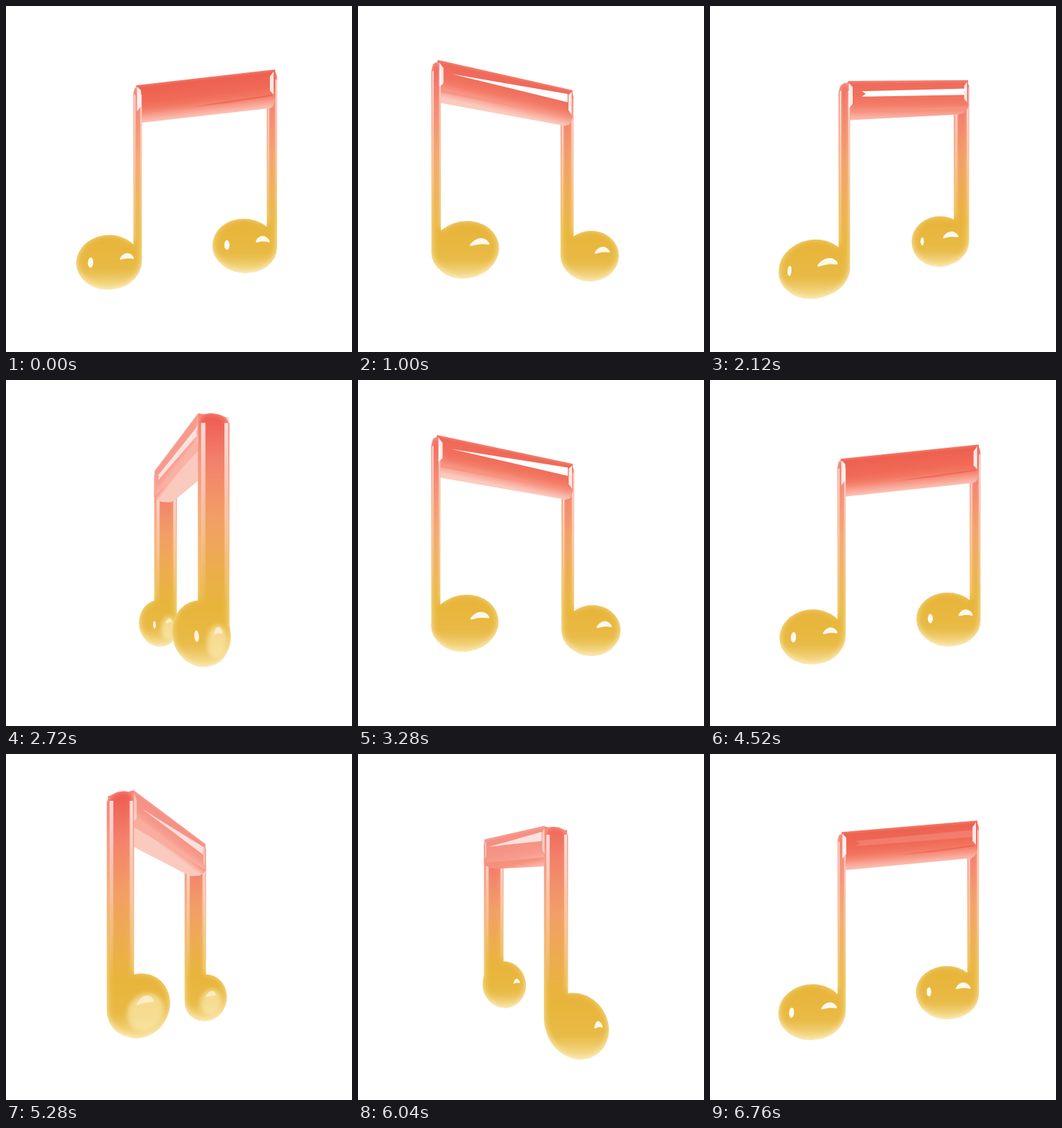
Write an HTML page with a canvas that moves like this. It is 480 px wide and 480 px high and loops after 6.8 s.

```html
<!DOCTYPE html>
<html lang="en">
<head>
<meta charset="utf-8">
<title>Spinning note</title>
<style>
  html, body { margin: 0; width: 100%; height: 100%; overflow: hidden; background: #fff; }
  canvas { display: block; width: 480px; height: 480px; }
</style>
</head>
<body>
<canvas id="stage" width="480" height="480"></canvas>
<script>
const ctx = document.getElementById('stage').getContext('2d');
const LOOP = 6800, STEP = 40, TURNS = 3;
const CENTER = 240, EYE = 510, AXIS_SHIFT = 3;
const HEAD = { x: 44, y: 37, z: 32 };
const STEM = { x: 5.5, z: 18 };
const BEAM = { depth: 17, fold: 39, height: 47 };
const LEFT = { x: -57, top: -125, head: { x: -97, y: 114.5 } };
const RIGHT = { x: 128, top: -146, head: { x: 90, y: 92 } };

let cos = 1, sin = 0;

const lerp = (a, b, u) => a + (b - a) * u;
const ramp = (a, b, v) => Math.min(1, Math.max(0, (v - a) / (b - a)));
const white = alpha => `rgba(255,255,255,${alpha})`;

// Turn a point around the vertical axis, then apply perspective.
function view([x, y, depth]) {
  const z = depth + AXIS_SHIFT;
  const k = EYE / (EYE - x * sin - z * cos);
  return [CENTER + (x * cos - z * sin) * k, CENTER + y * k];
}

function hull(points) {
  const sorted = points.map(view).sort((a, b) => a[0] - b[0] || a[1] - b[1]);
  const half = list => {
    const out = [];
    for (const p of list) {
      while (out.length > 1) {
        const [a, b] = out.slice(-2);
        if ((b[0] - a[0]) * (p[1] - a[1]) > (b[1] - a[1]) * (p[0] - a[0])) break;
        out.pop();
      }
      out.push(p);
    }
    return out.slice(0, -1);
  };
  return [...half(sorted), ...half(sorted.reverse())];
}

function outline(points) {
  const path = new Path2D();
  points.forEach(p => path.lineTo(p[0], p[1]));
  path.closePath();
  return path;
}

function fill(path, style) {
  ctx.fillStyle = style;
  ctx.fill(path);
}

function gradient(from, to, stops) {
  const g = ctx.createLinearGradient(...from, ...to);
  stops.forEach(([at, color]) => g.addColorStop(at, color));
  return g;
}

// Blurred fill that stays inside another shape.
function softFill(inside, path, style, blur, lift = 0) {
  ctx.save();
  ctx.clip(inside);
  ctx.filter = `blur(${blur}px)`;
  ctx.translate(0, -lift);
  fill(path, style);
  ctx.restore();
}

function ring(x, y, scale) {
  return Array.from({ length: 32 }, (_, i) => {
    const a = i / 16 * Math.PI;
    return [x + STEM.x * scale * Math.cos(a), y, STEM.z * scale * Math.sin(a)];
  });
}

function ellipsoid({ x, y }) {
  const points = [];
  for (let i = 0; i <= 16; i++) {
    const lat = (i / 16 - 0.5) * Math.PI, r = Math.cos(lat);
    for (let j = 0; j < 28; j++) {
      const lon = j / 14 * Math.PI;
      points.push([x + HEAD.x * r * Math.cos(lon), y + HEAD.y * Math.sin(lat), HEAD.z * r * Math.sin(lon)]);
    }
  }
  return points;
}

// Stem end curving into the underside of the head.
function bend(note) {
  return Array.from({ length: 9 }, (_, i) => {
    const a = i / 16 * Math.PI;
    return ring(lerp(note.head.x, note.x, Math.cos(a)), note.head.y + HEAD.y * Math.sin(a), Math.cos(a));
  }).flat();
}

// Patch of the head whose surface faces a fixed light.
function glint(center, light, rx, ry, arch = 0) {
  const lean = -(center.x * cos) / EYE / 2;
  return outline(Array.from({ length: 28 }, (_, i) => {
    const a = i / 14 * Math.PI, dx = rx * Math.cos(a);
    const X = light[0] + lean + dx, y = light[1] + ry * Math.sin(a) + arch * dx * dx;
    const Z = Math.sqrt(Math.max(0.02, 1 - X * X - y * y));
    const x = X * cos + Z * sin, z = Z * cos - X * sin;
    const h = Math.hypot(HEAD.x * x, HEAD.y * y, HEAD.z * z);
    return view([center.x + HEAD.x ** 2 * x / h, center.y + HEAD.y ** 2 * y / h, HEAD.z ** 2 * z / h]);
  }));
}

function shineHead(head, path) {
  const soft = ramp(0.4, 0.9, sin);
  if (soft) softFill(path, glint(head, [0.4, 0.05], 0.45, 0.55), `rgba(252,236,182,${0.7 * soft})`, 3);
  fill(glint(head, [-0.41, -0.14], 0.07, 0.16), white(0.95 * ramp(-0.2, 0.4, cos)));
  fill(glint(head, [0.45, -0.35], 0.2, 0.09, 2.5), white(0.9 - 0.4 * soft));
}

// Bright vertical reflections that fade on the way down.
function shineStem(note, points) {
  const xs = points.map(p => p[0]), min = Math.min(...xs), max = Math.max(...xs);
  const top = view([note.x, note.top + 9, 0])[1], foot = view([note.x, note.head.y - 35, 0])[1];
  const style = gradient([0, top], [0, foot], [[0, white(0.75)], [0.4, white(0.4)], [1, white(0)]]);
  for (const [from, to] of [[0.1, 0.24], [0.84, 0.96]]) {
    const a = lerp(min, max, from), b = lerp(min, max, to);
    fill(outline([[a, top], [b, top], [b, foot], [a, foot]]), style);
  }
}

function drawNote(note) {
  const { x, top, head } = note;
  const headPath = outline(hull([...ellipsoid(head), ...bend(note)]));
  const stem = hull([...ring(x, top, 0.4), ...ring(x, top + 2, 0.75), ...ring(x, top + 8, 1), ...ring(x, head.y, 1)]);
  const body = new Path2D(headPath);
  body.addPath(outline(stem));

  const start = view([x, -150, 0])[1], end = view([head.x, head.y + HEAD.y, 0])[1];
  const down = stops => gradient([0, start], [0, end], stops);
  fill(body, down([[0, '#ffc0b6'], [0.45, '#fcd9b8'], [0.75, '#fae7b0'], [1, '#fdf2cc']]));
  softFill(body, body, down([
    [0, '#ee574d'], [0.2, '#f3806b'], [0.43, '#f29f66'], [0.64, '#ecae4c'],
    [0.78, '#e8b53a'], [0.92, '#e8ba45'], [1, '#f5da8c']
  ]), 4, 2);
  shineStem(note, stem);
  shineHead(head, headPath);
}

const side = () => cos < 0 ? -1 : 1;

// Point on the visible beam face: u runs along it, v from top to fold.
function onFace(u, v) {
  return view([lerp(LEFT.x, RIGHT.x, u), lerp(LEFT.top, RIGHT.top, u) + BEAM.fold * v, side() * BEAM.depth]);
}

const facePatch = list => outline(list.map(([u, v]) => onFace(u, v)));

function drawBeam() {
  const solid = [];
  for (const { x, top } of [LEFT, RIGHT]) {
    for (const s of [-1, 1]) {
      solid.push([x, top + 1, s * BEAM.depth], [x, top + BEAM.fold, s * (BEAM.depth + 1)],
        [x, top + BEAM.height - 3, s * 14], [x, top + BEAM.height, s * 7]);
    }
  }
  const body = outline(hull(solid));
  const a = onFace(0, 0), b = onFace(1, 0), c = onFace(0, 1);
  const length = Math.hypot(b[0] - a[0], b[1] - a[1]) || 1;
  const nx = -(b[1] - a[1]) / length, ny = (b[0] - a[0]) / length;
  const drop = (c[0] - a[0]) * nx + (c[1] - a[1]) * ny;
  const across = (scale, stops) => gradient(a, [a[0] + nx * drop * scale, a[1] + ny * drop * scale], stops);

  fill(body, across(1.35, [[0, '#f4816f'], [0.74, '#f7917f'], [0.88, '#fab0a2'], [1, '#fbcabf']]));

  const face = facePatch([[0, 0], [1, 0], [1, 1], [0, 1]]);
  fill(face, across(1, [[0, '#f47a68'], [0.1, '#ee6050'], [0.6, '#f06a56'], [0.8, '#f27560'], [1, '#f68e7b']]));
  fill(face, `rgba(255,222,216,${0.5 * sin * sin})`);

  const shine = ramp(0.08, 0.3, Math.abs(sin)) * (1 - 0.3 * ramp(0.4, 0.9, Math.abs(sin)));
  if (shine) {
    const streak = cos > 0
      ? [[0.1, 0.34], [0.99, 0.32], [0.96, 0.44], [0.97, 0.56], [0.1, 0.52], [0.13, 0.43]]
      : [[0.91, 0.35], [0.6, 0.29], [0.04, 0.17], [0.04, 0.47], [0.6, 0.39]];
    fill(facePatch(streak), white(shine));
  }
  const low = 1 - ramp(0.1, 0.3, Math.abs(sin));
  if (low) fill(facePatch([[0.4, 0.95], [0.98, 0.84], [0.98, 0.9], [0.65, 0.96]]), `rgba(240,95,78,${0.7 * low})`);
}

function drawEnds() {
  const alpha = ramp(0.2, 0.7, Math.abs(cos)) * 0.85;
  if (!alpha) return;
  fill(facePatch([[0.005, 0.06], [0.033, 0.2], [0.033, 0.75], [0.005, 0.9]]), white(alpha));
  fill(facePatch([[0.99, 0.06], [0.963, 0.22], [0.963, 0.7], [0.99, 0.85]]), white(alpha));
}

function render(time) {
  const angle = time / LOOP * TURNS * 2 * Math.PI;
  cos = Math.cos(angle);
  sin = Math.sin(angle);
  ctx.fillStyle = '#fff';
  ctx.fillRect(0, 0, 480, 480);
  const [far, near] = sin > 0 ? [LEFT, RIGHT] : [RIGHT, LEFT];
  drawNote(far);
  drawBeam();
  drawNote(near);
  drawEnds();
}

function tick() {
  const time = performance.now() % LOOP;
  render(Math.floor(time / STEP) * STEP);
  requestAnimationFrame(tick);
}
tick();
</script>
</body>
</html>
```
